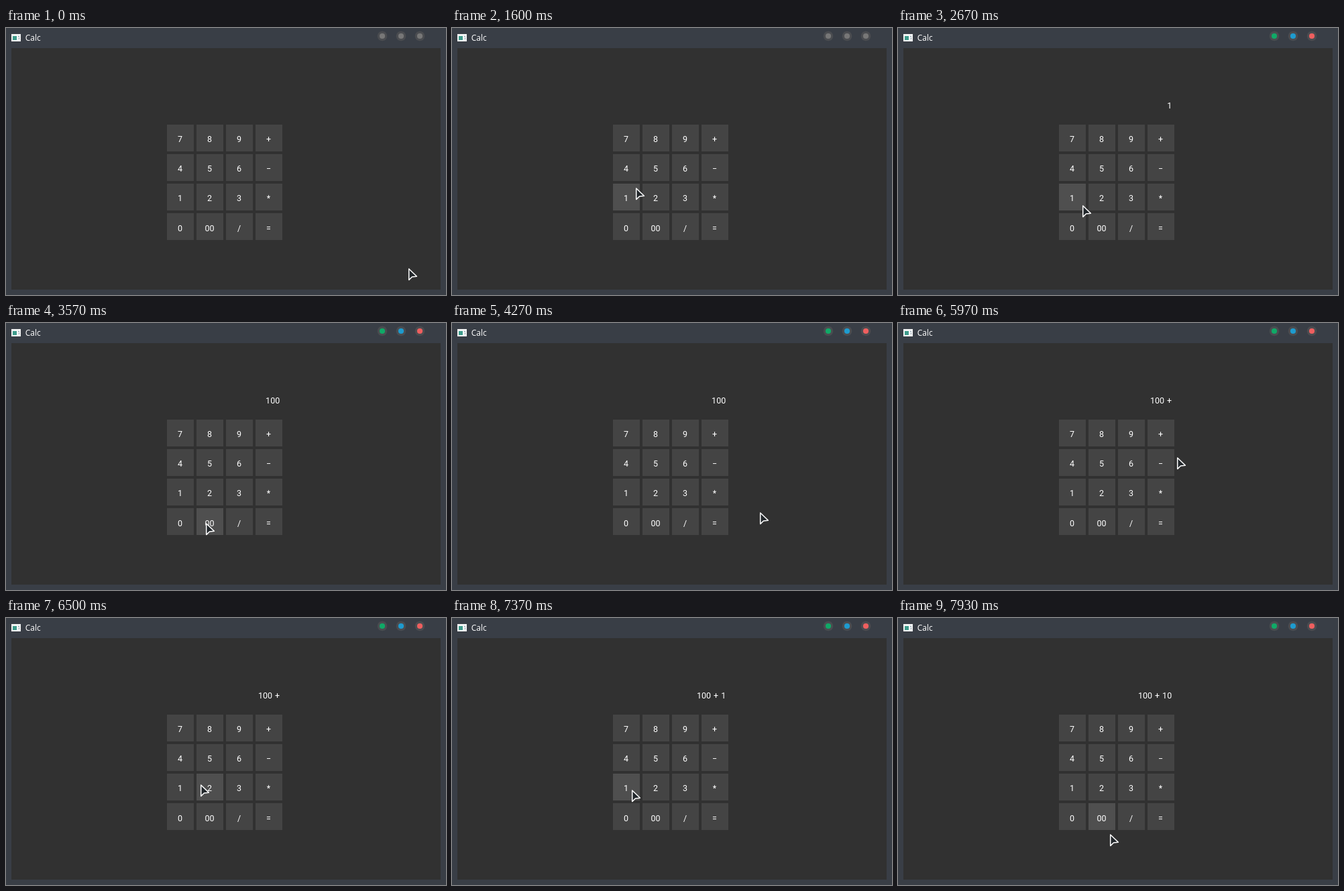
An HTML page for the animation above (8 s loop, 656 by 398 pixels).

```html
<!DOCTYPE html>
<html lang="en">
<head>
<meta charset="utf-8">
<title>Calc</title>
<style>
  html, body { margin: 0; width: 100%; height: 100%; overflow: hidden; background: #393e46; }
  svg { display: block; }
  text { fill: #fff; font: 12.5px Roboto, sans-serif; word-spacing: .9px; }
  .title { font: 12px "Open Sans", sans-serif; }
  .key { fill: #444; }
  .key.hover { fill: #4f4f4f; }
</style>
</head>
<body>
<svg id="stage" width="656" height="398" viewBox="0 0 656 398">
  <rect width="656" height="398" fill="#393e46"/>
  <rect x="8" y="30" width="640" height="360" fill="#313131"/>
  <g shape-rendering="crispEdges">
    <rect x="8" y="9" width="14" height="11" fill="#f4f6f6"/>
    <rect x="10" y="12" width="6" height="6" fill="#3f9c8c"/>
    <rect x="18" y="12" width="2" height="1" fill="#7f92a5"/>
    <rect x="19" y="14" width="1" height="3" fill="#9aa7b5"/>
  </g>
  <text class="title" x="28.7" y="19">Calc</text>
  <g id="dots"></g>
  <g id="keys"></g>
  <text id="display" x="408.2" y="120" text-anchor="end"></text>
  <path id="cursor" d="M1.7 1V17.6L6.4 13L13.4 12.2Z" fill="#22272b" stroke="#fff" stroke-width="1.5" stroke-linejoin="round"/>
</svg>
<script>
const LOOP = 8000, FPS = 30;
const LABELS = ['7', '8', '9', '+', '4', '5', '6', '−', '1', '2', '3', '*', '0', '00', '/', '='];
const DOT_COLORS = ['#10a967', '#1e9bcf', '#ee5f5f'];
const DOTS_ON = 66;

// Ticks at which the display grows to the given text
const DISPLAY = { 0: '', 69: '1', 97: '100', 159: '100 +', 221: '100 + 1', 233: '100 + 10' };

// Pointer moves between ticks; "bend" is the control point of a curved move.
const START = [599, 358];
const MOVES = [
  { from: 0, until: 4, to: [547, 325] },
  { from: 47, until: 48, to: [273, 238] },
  { from: 55, until: 56, to: [267, 255] },
  { from: 76, until: 91, to: [296, 293] },
  { from: 106, until: 107, to: [297, 298] },
  { from: 107, until: 131, to: [470, 251], bend: [419, 410] },
  { from: 132, until: 149, to: [403, 168] },
  { from: 165, until: 190, to: [306, 234], bend: [490, 190] },
  { from: 190, until: 201, to: [267, 256], bend: [288, 253] },
  { from: 222, until: 227, to: [265, 288] },
  { from: 235, until: 238, to: [315, 322] }
];

const el = id => document.getElementById(id);
const mix = (a, b, u) => a.map((v, i) => v + (b[i] - v) * u);
const ease = u => u * (0.8 + 0.2 * u * (3 - 2 * u));

function add(parent, tag, attrs, content = '') {
  const node = document.createElementNS('http://www.w3.org/2000/svg', tag);
  for (const name in attrs) node.setAttribute(name, attrs[name]);
  node.textContent = content;
  return parent.appendChild(node);
}

const dots = DOT_COLORS.map((color, i) => {
  const at = { cx: 561 + 28 * i, cy: 12 };
  add(el('dots'), 'circle', { ...at, r: 7.3, fill: '#4a4c50' });
  return add(el('dots'), 'circle', { ...at, r: 4.1 });
});

const keys = LABELS.map((label, i) => {
  const row = Math.floor(i / 4), x = 240 + 44 * (i % 4), y = 144 + 44 * row;
  const node = add(el('keys'), 'rect', { x, y, width: 40, height: 40, class: 'key' });
  add(el('keys'), 'text', { x: x + 19.5, y: y + 26 + 0.2 * row, 'text-anchor': 'middle' }, label);
  return { x, y, node };
});

function pointer(tick) {
  let at = START;
  for (const { from, until, to, bend = mix(at, to, 0.5) } of MOVES) {
    if (tick <= from) break;
    const u = ease(Math.min(1, (tick - from) / (until - from)));
    at = mix(mix(at, bend, u), mix(bend, to, u), u);
  }
  return at;
}

const keyAt = ([x, y]) =>
  keys.find(k => x >= k.x && x < k.x + 40 && y >= k.y && y < k.y + 40);

function draw(time) {
  const tick = Math.floor((time + 4) * FPS / 1000) % (LOOP * FPS / 1000);
  const [x, y] = pointer(tick).map(Math.round);
  el('cursor').setAttribute('transform', `translate(${x} ${y})`);

  // The highlight lingers for one tick after the pointer leaves a key.
  const hovered = keyAt([x, y]) || keyAt(pointer(tick - 1));
  keys.forEach(k => k.node.classList.toggle('hover', k === hovered));

  dots.forEach((dot, i) => dot.setAttribute('fill', tick < DOTS_ON ? '#777' : DOT_COLORS[i]));
  const shown = Object.keys(DISPLAY).filter(from => from <= tick).pop();
  el('display').textContent = DISPLAY[shown];
}

function run() {
  draw(performance.now() % LOOP);
  requestAnimationFrame(run);
}
run();
</script>
</body>
</html>
```
